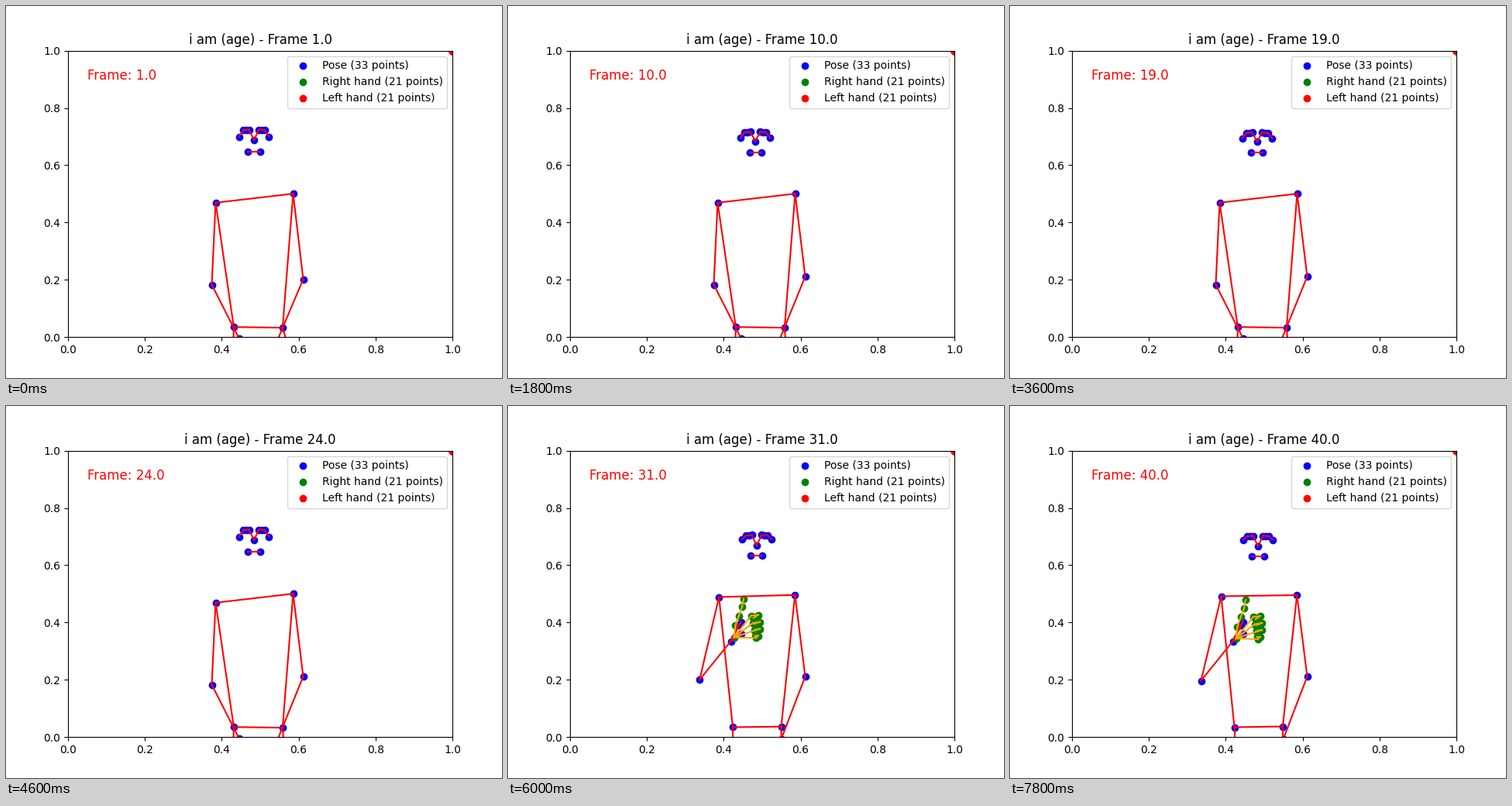
Animation, 640 px wide and 480 px high, one loop 8 s. Source, as a matplotlib script:

```python
import numpy as np
import matplotlib.pyplot as plt
from matplotlib.animation import FuncAnimation

COUNT = 40
HAND_START = 30

CHAINS = [
    "nose in_l eye_l out_l ear_l",
    "nose in_r eye_r out_r ear_r",
    "mouth_l mouth_r",
    "shoulder_l shoulder_r elbow_r wrist_r",
    "shoulder_l elbow_l wrist_l pinky index wrist_l thumb",
    "shoulder_l hip_l hip_r shoulder_r",
    "hip_l knee_l",
    "hip_r knee_r",
]
names = list(dict.fromkeys(" ".join(CHAINS).split()))
bones = []
for chain in CHAINS:
    ids = [names.index(n) for n in chain.split()]
    bones += zip(ids, ids[1:])

# Each finger is a chain of four points that starts at the wrist
hand_bones = []
for base in range(1, 21, 4):
    ids = [0, *range(base, base + 4)]
    hand_bones += zip(ids, ids[1:])


def ease(t, start=0, end=1):
    s = np.clip((t - start) / (end - start), 0, 1)
    return s * s * (3 - 2 * s)


def mix(a, b, k):
    return np.array(a) + (np.array(b) - np.array(a)) * k


def face_at(n, lift, settle):
    """Mirrored features around the nose; the head dips, rises and nods."""
    dip = 3.7 * ease(n, 1, 14) * (1 - ease(n, 19, 24))
    nod = 8 * lift
    cx = 319.5 - 0.3 * dip + lift - settle
    pts = {"nose": (cx, 172.4 + 0.6 * dip + 1.05 * nod)}
    # name, half width, height, share of the dip, share of the nod
    for name, half, y, a, b in [("in", 6.3, 159, 1, 1),
                                ("eye", 10.3, 159.3, 1, 1),
                                ("out", 13.7, 159.5, 1, 1),
                                ("ear", 19.3, 168, 0.6, 0.5),
                                ("mouth", 7.6, 187, 0.5, 0.85)]:
        y += a * dip + b * nod
        pts[name + "_l"] = (cx - half, y)
        pts[name + "_r"] = (cx + half, y)
    return pts


def body_at(n, lift, settle):
    """The torso shifts with the lift while the forearm swings up."""
    swing = ease(n, 24, 29.8)
    relax = ease(n, 1, 9)
    wrist = mix((300, 428), (287, 303), swing)
    return {
        "shoulder_l": mix((270, 253.3), (272, 245), lift),
        "shoulder_r": mix((370, 241.7), (369.8, 243.5), lift),
        "elbow_l": mix((265, 359), (244, 352), lift) + 2 * settle,
        "elbow_r": mix((383, 352), (383, 348.6), relax),
        "wrist_l": wrist,
        "wrist_r": mix((347, 437), (352, 429.5), swing),
        "pinky": wrist + mix((0, 18), (10, -21), swing),
        "index": wrist + mix((3, 18), (13, -25), swing),
        "thumb": wrist + mix((5, 11), (13, -10), swing),
        "hip_l": mix((293.4, 413.7), (289, 414), lift),
        "hip_r": mix((356.4, 414.6), (351.4, 413), lift),
        "knee_l": (289, 560),
        "knee_r": mix((400 - 33 * relax, 560), (352, 560), lift),
    }


def hand_at(wrist, settle):
    """Raised thumb and four curled fingers."""
    pts = [(0, 0)]
    for k in np.arange(1, 5) / 4:
        pts.append((12.5 * ease(k), -50 * k ** 0.85))
    for j in range(4):
        knuckle = np.array((22.3 + 2 * j, -28 + 9.6 * j))
        bend = np.array((29.5 + 4.5 * np.sin(np.pi * (j + 0.5) / 4),
                         -29 + 9 * j))
        tip = np.array((25.3 + 0.6 * j, -25 + 7.7 * j))
        pts += [knuckle, bend, mix(bend, tip, 0.6), tip]
    return np.array(pts) + wrist + (4, -5 + 1.5 * settle)


def to_axes(px):
    px = np.asarray(px) + 0.5
    return np.column_stack([(px[:, 0] - 80) / 496, (427.2 - px[:, 1]) / 369.6])


def figure_at(n):
    lift, settle = ease(n, 24, 33), ease(n, 34, 40)
    joints = face_at(n, lift, settle) | body_at(n, lift, settle)
    pose = to_axes([joints[k] for k in names])
    if n < HAND_START:
        return pose, np.ones((21, 2))
    return pose, to_axes(hand_at(joints["wrist_l"], settle))


fig, ax = plt.subplots(figsize=(6.4, 4.8), dpi=100)
ax.set_xlim(0, 1)
ax.set_ylim(0, 1)
pose_dots = ax.scatter([], [], color="blue", label="Pose (33 points)")
hand_dots = ax.scatter([], [], color="green", label="Right hand (21 points)")
ax.scatter([1] * 21, [1] * 21, color="red", label="Left hand (21 points)")
pose_lines = [ax.plot([], [], color="red")[0] for _ in bones]
hand_lines = [ax.plot([], [], color="orange")[0] for _ in hand_bones]
label = ax.text(0.05, 0.9, "", fontsize=12, color="red")
title = ax.set_title("")
ax.legend(loc="upper right")


def link(lines, pairs, pts):
    for line, (a, b) in zip(lines, pairs):
        line.set_data(pts[[a, b], 0], pts[[a, b], 1])


def draw(i):
    n = i + 1
    pose, hand = figure_at(n)
    pose_dots.set_offsets(pose)
    hand_dots.set_offsets(hand)
    link(pose_lines, bones, pose)
    link(hand_lines, hand_bones, hand)
    for line in hand_lines:
        line.set_visible(n >= HAND_START)
    label.set_text(f"Frame: {n:.1f}")
    title.set_text(f"i am (age) - Frame {n:.1f}")
    return []


anim = FuncAnimation(fig, draw, frames=COUNT, interval=200, repeat=True,
                     repeat_delay=0, init_func=lambda: draw(0))
plt.show()
```
